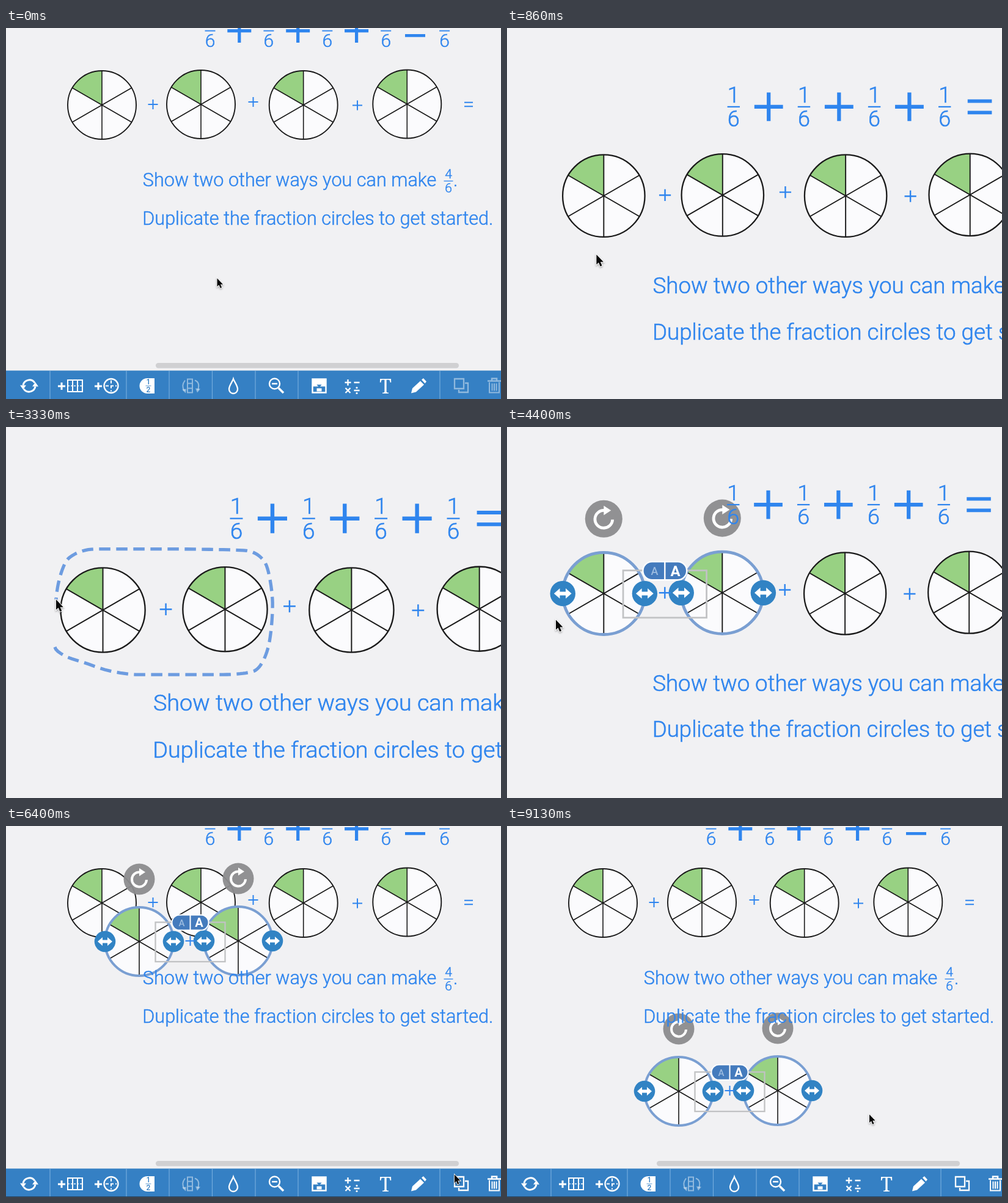
Recreate the animation shown at these times as an HTML page with a canvas. Size 810x607 px, loop 9530 ms.

```html
<!DOCTYPE html>
<html lang="en">
<head>
<meta charset="utf-8">
<title>Fraction circles</title>
<style>
  html, body { margin: 0; width: 810px; height: 607px; overflow: hidden; background: #f1f1f3; }
  canvas { display: block; }
</style>
</head>
<body>
<canvas id="stage" width="810" height="607"></canvas>
<script>
const ctx = document.getElementById('stage').getContext('2d');
const LOOP = 9530, BLUE = '#2f85ee', BAR = '#3580c4', WHITE = '#fff';
const LASSO_START = 1270, SELECT = 3530, DUPLICATE = 6000;
const GRAB = 7430, RELEASE = 8700;

// [time, x, y] in board coordinates
const pointer = [
  [540, 345.5, 409.5], [1000, 91.5, 149], [1170, 91.5, 149], [1270, 93.3, 175],
  [1330, 105, 186], [1400, 136, 197], [1450, 170, 207.6], [1500, 203, 211.6],
  [1730, 315, 211.6], [1900, 357, 207], [2130, 378, 167], [2300, 382, 118],
  [2450, 373, 65], [2600, 345, 47], [2800, 231, 45], [2950, 150, 45],
  [3130, 112, 57], [3300, 96, 102], [3500, 91.6, 162], [4400, 91.6, 162],
  [4860, 318, 320], [5260, 537, 462], [5800, 745, 581], [6300, 745, 581],
  [7260, 385, 236], [7300, 385, 236], [7430, 380, 215], [8690, 380, 215],
  [8700, 445, 457], [8970, 445, 457], [9130, 593, 472]
];
const drag = [[7560, 61, 63], [7800, 41, 134], [8050, 54, 215], [8460, 124, 308]];

// Monotone cubic through the keys: rests at holds and turning points
function track(keys, t) {
  const last = keys.length - 1;
  if (t <= keys[0][0]) return keys[0].slice(1);
  if (t >= keys[last][0]) return keys[last].slice(1);
  const i = keys.findIndex(k => k[0] > t) - 1;
  const dt = keys[i + 1][0] - keys[i][0], u = (t - keys[i][0]) / dt;
  return [1, 2].map(c => {
    const slope = j => (keys[j + 1][c] - keys[j][c]) / (keys[j + 1][0] - keys[j][0]);
    const tangent = j => {
      if (j < 1 || j >= last) return 0;
      const a = slope(j - 1), b = slope(j);
      return a * b <= 0 ? 0 : 2 * a * b / (a + b);
    };
    const s = u * u * (3 - 2 * u);
    return keys[i][c] * (1 - s) + keys[i + 1][c] * s
      + dt * u * (1 - u) * ((1 - u) * tangent(i) - u * tangent(i + 1));
  });
}

function ease(u) {
  u = Math.min(1, Math.max(0, u));
  return u * u * (3 - 2 * u);
}

function at(x, y, draw) {
  ctx.save();
  ctx.translate(x, y);
  draw();
  ctx.restore();
}
function fill(path, color = WHITE) {
  ctx.fillStyle = color;
  ctx.fill(new Path2D(path));
}
function stroke(path, width = 2, color = WHITE) {
  ctx.lineWidth = width;
  ctx.strokeStyle = color;
  ctx.stroke(new Path2D(path));
}
function disc(x, y, r, color) {
  ctx.beginPath();
  ctx.arc(x, y, r, 0, 2 * Math.PI);
  ctx.fillStyle = color;
  ctx.fill();
}
// A hairline outline gives the light weight its slightly fuller strokes
function text(str, x, y, size, { color = BLUE, weight = 300, align = 'left', family = 'Roboto, sans-serif' } = {}) {
  ctx.font = `${weight} ${size}px ${family}`;
  ctx.textAlign = align;
  ctx.fillStyle = ctx.strokeStyle = color;
  ctx.fillText(str, x, y);
  ctx.lineWidth = .5;
  if (weight === 300) ctx.strokeText(str, x, y);
}

function fraction(top, bottom, x, y, size, half, color = BLUE, weight = 300) {
  text(top, x, y - .2 * size, size, { align: 'center', color, weight });
  text(bottom, x, y + .89 * size, size, { align: 'center', color, weight });
  at(x, y, () => stroke(`M${-half} 0H${half}`, size / 16, color));
}
function plus(x, y, r, width, color = BLUE) {
  at(x, y, () => stroke(`M${-r} 0H${r}M0 ${-r}V${r}`, width, color));
}
function equals(x, y, r, gap, width) {
  at(x, y, () => stroke(`M${-r} ${-gap}H${r}M${-r} ${gap}H${r}`, width, BLUE));
}

function fractionCircle(x, y, selected) {
  at(x, y, () => {
    disc(0, 0, 56, '#fbfbfd');
    fill('M0 0V-56A56 56 0 0 0 -48.5 -28Z', '#98d183');
    stroke('M0 -56V56M-48.5 -28L48.5 28M-48.5 28L48.5 -28', 1.6, '#1a1a1a');
    ctx.beginPath();
    ctx.arc(0, 0, 56, 0, 2 * Math.PI);
    ctx.lineWidth = selected ? 4 : 1.9;
    ctx.strokeStyle = selected ? '#7a9fd2' : '#1a1a1a';
    ctx.stroke();
  });
}

function rotateHandle(x, y) {
  at(x, y, () => {
    disc(0, 0, 25.5, 'rgba(140,140,142,.94)');
    stroke('M1 -11.5A12 12 0 1 0 12 1', 4);
    fill('M0 -18L10 -11.5L0 -5Z');
  });
}
function sizeHandle(x, y) {
  at(x, y, () => {
    disc(0, 0, 17.3, '#3183c4');
    fill('M-12 0L-4 -7V-2.5H4V-7L12 0L4 7V2.5H-4V7Z');
  });
}

function selectionFrame() {
  ctx.lineWidth = 2.3;
  ctx.strokeStyle = '#c1c2c4';
  ctx.strokeRect(183.5, 94.5, 114, 64.5);
  for (const [x, y] of [[157, 126], [319, 125]]) {
    sizeHandle(x - 56, y);
    sizeHandle(x + 56, y);
  }
}
function sizePill() {
  at(240.5, 95, () => {
    ctx.beginPath();
    ctx.roundRect(-30, -12.5, 60, 25, 12.5);
    ctx.fillStyle = '#447bbd';
    ctx.fill();
    ctx.lineWidth = 2;
    ctx.strokeStyle = WHITE;
    ctx.stroke();
    stroke('M0 -12V12', 2);
    text('A', -14, 5.5, 15, { color: '#9dbce0', weight: 500, align: 'center' });
    text('A', 14.5, 7, 20, { color: WHITE, weight: 700, align: 'center' });
  });
}

function boardText() {
  for (let i = 0; i < 5; i++) {
    const x = 334 + i * 95.9;
    fraction(i < 4 ? '1' : '4', '6', x, 4.6, 30, 8.5);
    if (i < 3) plus(x + 47.8, 4.6, 19.5, 5.2);
  }
  equals(669.5, 4.6, 16.5, 7.8, 4.8);
  plus(240.5, 125, 8, 2);
  plus(404.5, 121, 8, 2);
  plus(575, 126.5, 8, 2);
  equals(757, 125, 7, 3.3, 2);
  text('Show two other ways you can make', 223.8, 259, 30.6);
  fraction('4', '6', 724, 250.4, 21, 7.5);
  text('.', 732, 259, 30.6);
  text('Duplicate the fraction circles to get started.', 223.3, 322, 30.6);
}

const faded = draw => {
  ctx.globalAlpha = .45;
  draw();
  ctx.globalAlpha = 1;
};

function toolbar(active, pressed) {
  ctx.fillStyle = BAR;
  ctx.fillRect(-10, 560.5, 840, 60);
  if (pressed) {
    ctx.fillStyle = '#2c6ca9';
    ctx.fillRect(711, 560.5, 65, 47);
  }
  for (const x of [72, 197, 267, 337.5, 408, 478, 710]) stroke(`M${x} 561V607`, 1.2, '#74abdd');

  at(38, 585.5, () => {
    stroke('M-10 -1A10.5 10.5 0 0 1 9 -5M10 1A10.5 10.5 0 0 1 -9 5', 3);
    fill('M-15 -1H-5L-10 6ZM15 1H5L10 -6Z');
  });
  plus(91, 586, 6, 3, WHITE);
  at(113, 585.5, () => {
    stroke('M-12 -9.5H12V9.5H-12ZM-4 -9V9M4 -9V9', 2);
    ctx.setLineDash([3, 2]);
    stroke('M-12 0H12', 1.5);
  });
  plus(151, 586, 6, 3, WHITE);
  at(172, 585.5, () => {
    stroke('M-11.5 0A11.5 11.5 0 1 1 11.5 0A11.5 11.5 0 1 1 -11.5 0', 2.3);
    ctx.setLineDash([5, 3]);
    stroke('M0 -9V9M-9 0H9', 2);
  });
  at(231, 585.5, () => {
    fill('M12 -12.5V12.5H0A12.5 12.5 0 0 1 0 -12.5Z');
    fraction('1', '2', 2, 0, 12, 4.5, BAR, 500);
  });
  faded(() => at(302, 585.5, () => {
    stroke('M-5 -11H3V11H-5ZM-5 -4H3M-5 4H3', 2);
    stroke('M-9 -9Q-16 0 -10 8M7 -9Q16 -6 12 7', 2);
    fill('M-14 6L-7 5L-8 12ZM8 4L16 5L11 11Z');
  }));
  at(372, 586, () => stroke('M0 -12C2 -6 7 -1 7 5A7 7 0 0 1 -7 5C-7 -1 -2 -6 0 -12Z', 2.3));
  at(442, 585, () => {
    stroke('M-11 -3A8.5 8.5 0 1 1 6 -3A8.5 8.5 0 1 1 -11 -3M-7 -3H2', 2.4);
    stroke('M4 4L12 12', 3.5);
  });
  at(512.5, 585.5, () => {
    stroke('M-11 -11H11V11H-11Z', 2.4);
    fill('M-11 -11H11V1H-11ZM-4 4H4V9H-4Z');
    fill('M-4 -2H4L0 3Z', BAR);
  });
  at(566.5, 586, () => {
    stroke('M-12 -6H-2M-7 -11V-1M3 -6H12M-11 3L-3 11M-3 3L-11 11M3 7H12', 2.3);
    for (const y of [2.5, 11.5]) disc(7.5, y, 1.6, WHITE);
  });
  text('T', 621, 597.5, 32, { color: WHITE, weight: 500, align: 'center', family: '"Noto Serif", serif' });
  at(675, 585.5, () => {
    fill('M-12 12L-10 4L3 -8L9 -2L-4 10ZM5 -10L8 -12.5L13 -7L10.5 -4Z');
  });
  const editTools = () => {
    at(745, 585, () => stroke('M-11 -11H4V5H-11ZM6 -4H11V11H-4V7', 2.3));
    at(799, 585.5, () => {
      stroke('M-11 -8H11M-4 -9V-12H4V-9', 2.5);
      stroke('M-8 -6V11H8V-6M-3.5 -4V8M0 -4V8M3.5 -4V8', 2);
    });
  };
  active ? editTools() : faded(editTools);
}

function shadowed(draw) {
  ctx.shadowColor = 'rgba(0,0,0,.35)';
  ctx.shadowBlur = 3;
  ctx.shadowOffsetY = 1.5;
  draw();
  ctx.shadowColor = 'transparent';
}
function arrowCursor() {
  const shape = 'M0 0V13.6L3 10.8L5.2 16L7.6 15L5.4 10H9.6Z';
  shadowed(() => stroke(shape, 1.6));
  fill(shape, '#080808');
}
function handCursor() {
  const shape = 'M-4 -9Q-2 -11 0 -8L2 -3Q4 -5 5 -2Q7 -4 8 -1Q9 3 6 6L6 10H-2Q-4 5 -8 2Q-8 -1 -4 1L-6 -6Q-6 -9 -4 -9Z';
  shadowed(() => fill(shape));
  stroke(shape, 1.3, '#222');
  stroke('M0 3V7M3 3V7', 1, '#222');
}

function lasso(t) {
  ctx.beginPath();
  for (let s = LASSO_START; s < t; s += 15) ctx.lineTo(...track(pointer, s));
  ctx.lineTo(...track(pointer, t));
  ctx.setLineDash([15, 7.7]);
  ctx.lineWidth = 4.3;
  ctx.strokeStyle = '#6d9ce0';
  ctx.stroke();
  ctx.setLineDash([]);
}

function render(t) {
  const zoom = ease((t - 378) / 634) - ease((t - 4245) / 625);
  const scale = 1 + .234 * zoom;
  const selected = t >= SELECT, copied = t >= DUPLICATE;
  const offset = copied ? track(drag, t) : [0, 0];
  const [px, py] = track(pointer, t);

  ctx.setTransform(1, 0, 0, 1, 0, 0);
  ctx.fillStyle = '#f1f1f3';
  ctx.fillRect(0, 0, 810, 607);
  ctx.setTransform(scale, 0, 0, scale, -35.2 * zoom, 144 * zoom);

  [[157, 126], [319, 125], [486.7, 126], [656.3, 124.5]].forEach(([x, y], i) =>
    fractionCircle(x, y, selected && !copied && i < 2));
  if (selected) at(...offset, () => {
    if (copied) {
      fractionCircle(157, 126, true);
      fractionCircle(319, 125, true);
    }
    rotateHandle(157, 24);
    rotateHandle(319, 23);
    selectionFrame();
    if (copied) plus(240.5, 125, 8, 2);
  });
  boardText();
  if (selected) at(...offset, sizePill);
  else if (t > LASSO_START) lasso(t);

  const hover = py > 546 && py < 558 && px < 741;
  ctx.beginPath();
  ctx.roundRect(245, 548, 496, 8.5, 4.2);
  ctx.fillStyle = hover ? '#bbbbbd' : '#d0d0d2';
  ctx.fill();
  toolbar(selected, copied && t < 6400);

  if (t >= GRAB && t < RELEASE) at(offset[0] + 319, offset[1] + 156, handCursor);
  else at(px, py, arrowCursor);

  if (t > 4800) {
    ctx.fillStyle = '#24435f';
    ctx.fillRect(0, 606, 810, 1);
  }
}

function frame() {
  render(performance.now() % LOOP);
  requestAnimationFrame(frame);
}
frame();
</script>
</body>
</html>
```
